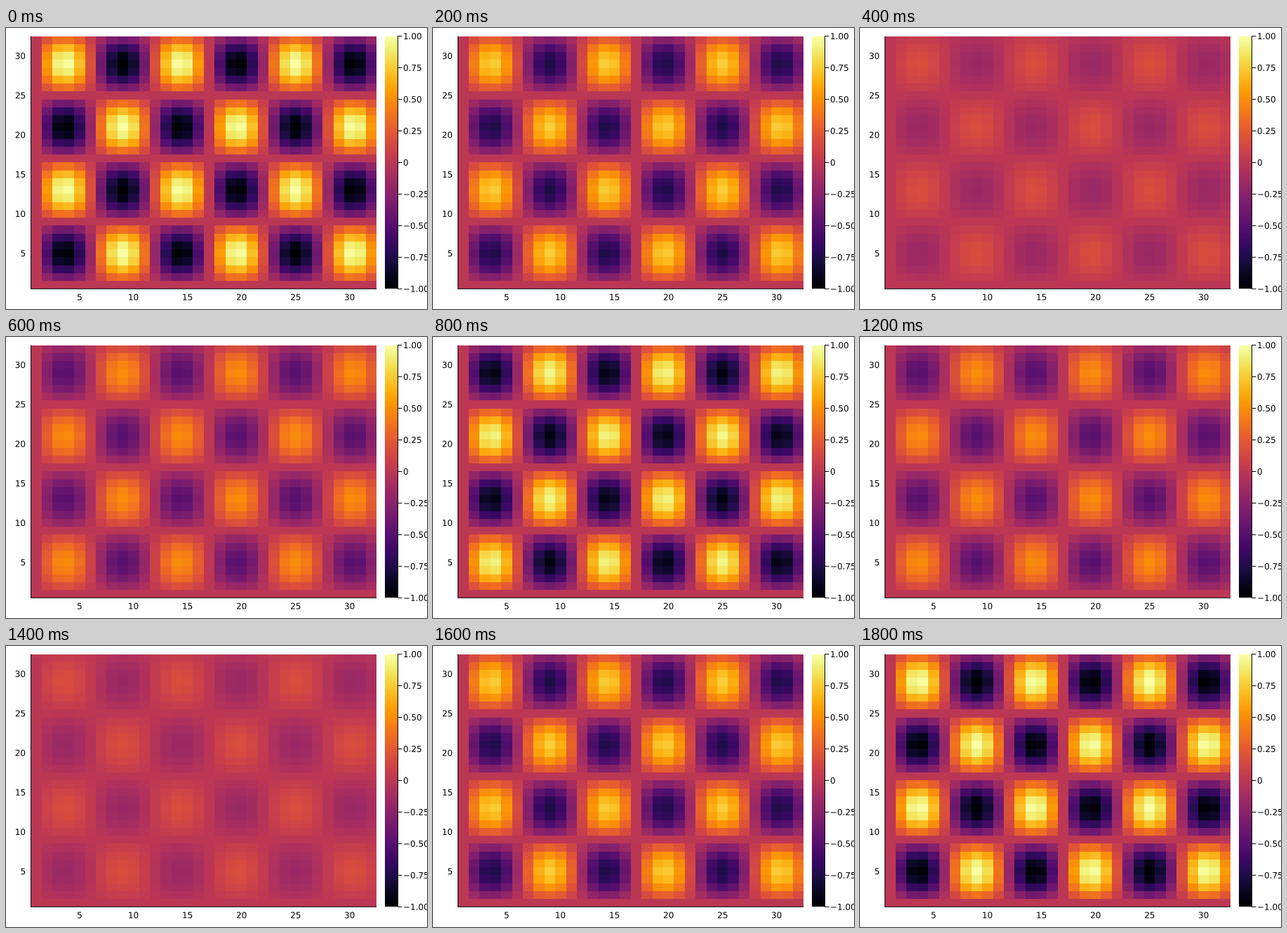
Write a matplotlib script that moves like this. It is 600x400 px and loops after 2 s.

```python
import numpy as np
import matplotlib.pyplot as plt
from matplotlib.animation import FuncAnimation
from matplotlib.patches import PathPatch
from matplotlib.textpath import TextPath
from matplotlib.transforms import Affine2D

W, H, DPI = 600, 400, 100
N = 32
FRAMES, INTERVAL = 10, 200
LEFT, RIGHT, TOP, BOTTOM = 35.55, 528.2, 11.6, 371.3
BAR_LEFT, BAR_RIGHT = 540, 558
FONT = 12

fig = plt.figure(figsize=(W / DPI, H / DPI), dpi=DPI, facecolor="white")
ax = fig.add_axes([0, 0, 1, 1])
ax.axis("off")


def label(x, y, text, align):
    """Draw text as outlines at sub-pixel positions, centred on y."""
    path = TextPath((0, 0), text, size=FONT, prop={"family": "DejaVu Sans"})
    box = path.get_extents()
    shift = {"left": 0, "center": (box.x0 + box.x1) / 2, "right": box.x1}[align]
    place = Affine2D().translate(-shift, -0.365 * FONT).scale(1, -1).translate(x, y)
    ax.add_patch(PathPatch(place.transform_path(path), fc="black", lw=0, snap=False))


def line(xs, ys):
    ax.plot(xs, ys, color="black", lw=72 / DPI, snap=False, solid_capstyle="butt")


def mesh(xs, ys, values):
    return ax.pcolormesh(xs, ys, values, cmap="inferno", vmin=-1, vmax=1,
                         antialiased=False, linewidth=0)


# Standing wave: three periods across, two periods up.
k = np.arange(N) * 2 * np.pi / N
wave = np.outer(np.sin(2 * k), np.sin(3 * k))
cols = np.round(np.linspace(LEFT, RIGHT, N + 1))
rows = np.round(np.linspace(BOTTOM, TOP, N + 1))
heat = mesh(cols, rows, -wave)
line([LEFT, LEFT], [TOP, BOTTOM])
line([LEFT - 0.5, RIGHT], [BOTTOM, BOTTOM])

for n in range(5, 31, 5):
    step = (n - 0.5) / N
    label(LEFT + step * (RIGHT - LEFT), 383, str(n), "center")
    label(27.2, BOTTOM + step * (TOP - BOTTOM), str(n), "right")

levels = np.linspace(-1, 1, 256)[:, None]
mesh([BAR_LEFT, BAR_RIGHT], np.linspace(371, 12, 257), levels)
line([BAR_RIGHT + 0.5] * 2, [TOP, BOTTOM])
for v in np.linspace(-1, 1, 9):
    y = (TOP + BOTTOM) / 2 - v * (BOTTOM - TOP) / 2
    line([BAR_RIGHT, BAR_RIGHT + 6.5], [y, y])
    text = f"{v:.2f}".replace("-", "\u2212") if v else "0"
    label(566, y, text, "left")

ax.set_xlim(0, W)
ax.set_ylim(H, 0)


def update(n):
    # Both ends of the loop show the same phase.
    phase = 2 * np.pi * n / (FRAMES - 1)
    heat.set_array(-np.cos(phase) * wave)
    return (heat,)


anim = FuncAnimation(fig, update, frames=FRAMES, interval=INTERVAL,
                     repeat=True, repeat_delay=0)
plt.show()
```
